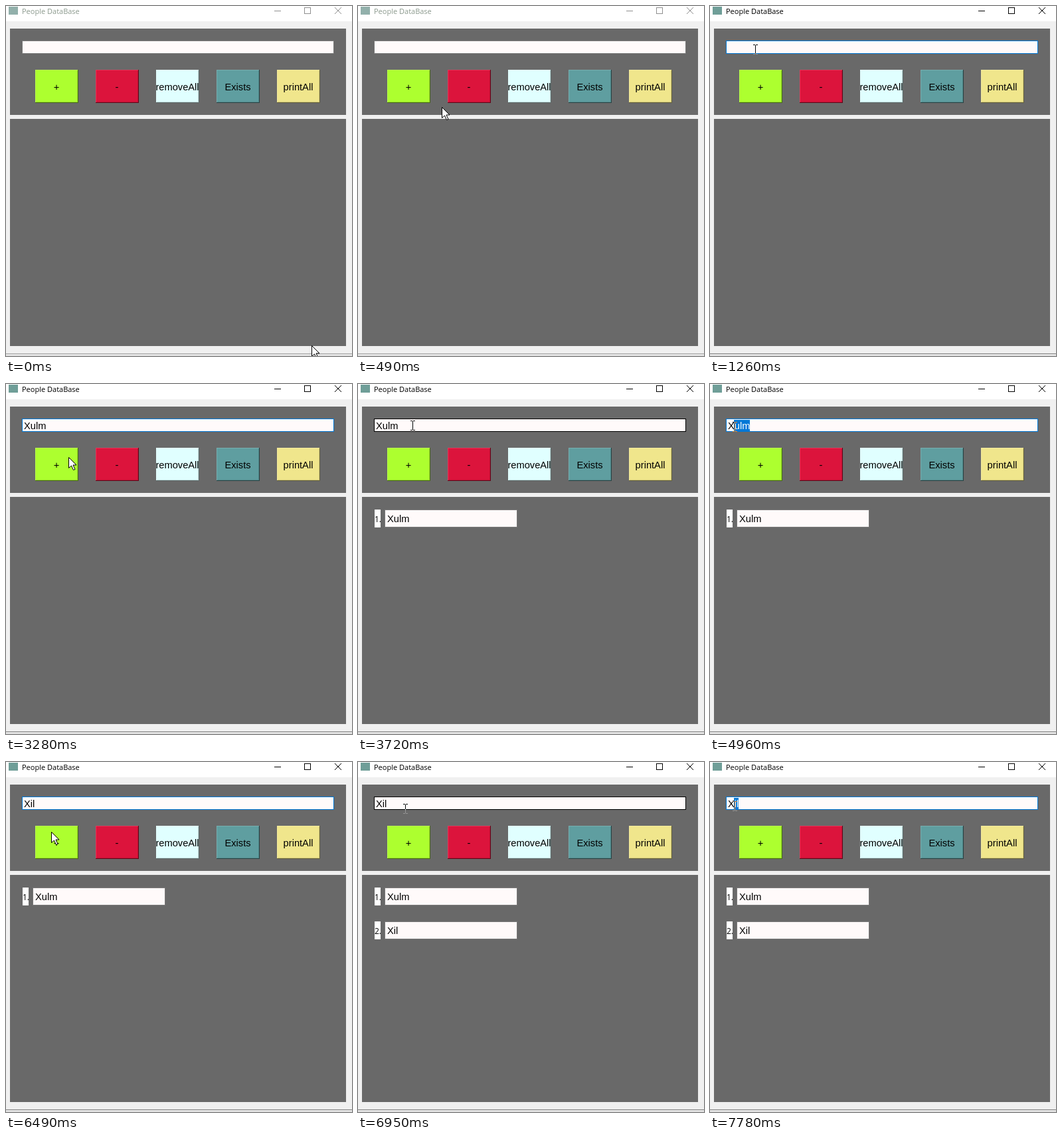
An HTML page with a canvas that plays this animation: 521x527 px, repeating every 8000 ms.

```html
<!DOCTYPE html>
<html lang="en">
<head>
<meta charset="utf-8">
<title>People DataBase</title>
<style>
  html, body { margin: 0; width: 100%; height: 100%; overflow: hidden; background: #f0f0f0; }
  canvas { display: block; }
</style>
</head>
<body>
<canvas id="stage" width="521" height="527"></canvas>
<script>
const ctx = document.getElementById('stage').getContext('2d', { alpha: false });
const LOOP = 8000;
const BLUE = '#0078d7', DIM = '#696969', SNOW = '#fffafa', IDLE = '#7a7a7a';
const UI_FONT = '14.67px "Liberation Sans", Arial, sans-serif';
const TITLE_FONT = '11px "Open Sans", "Noto Sans", sans-serif';
const NUMBER_FONT = '12px "Open Sans", "Noto Sans", sans-serif';
const FIELD = { x: 24, y: 52, w: 470, h: 20 };
const TEXT_X = 27;

const buttons = {
  '+': 'greenyellow', '-': 'crimson', removeAll: 'lightcyan', Exists: 'cadetblue', printAll: 'khaki'
};

// Each round: click into the field, type a name, press "+"
const rounds = [
  { name: 'Xulm', focus: 720, typing: 1690, pace: 270, add: 3440 },
  { name: 'Xil', focus: 3760, typing: 5380, pace: 160, add: 6600 },
  { name: '', focus: 7120, typing: LOOP, pace: 1, add: LOOP }
];

// Pointer glides: start time, end time, destination
const home = [460, 511];
const glides = [
  [20, 600, 92, 115],
  [600, 740, 72, 55],
  [850, 1260, 68, 65],
  [3110, 3280, 94, 110],
  [3560, 3720, 82, 62],
  [3760, 3980, 16, 63],
  [4260, 4960, 37, 64],
  [6270, 6490, 68, 105],
  [6750, 7020, 72, 63],
  [7120, 7500, 27, 68],
  [7730, 7780, 37, 66]
];

function pointerAt(t) {
  let [x, y] = home;
  for (const [start, end, toX, toY] of glides) {
    const u = Math.min(1, Math.max(0, (t - start) / (end - start)));
    const eased = u * u * (3 - 2 * u);
    x += (toX - x) * eased;
    y += (toY - y) * eased;
  }
  return [Math.round(x), Math.round(y)];
}

function typedAt(t) {
  const round = rounds.filter(r => r.typing <= t).pop();
  return round ? round.name.slice(0, 1 + Math.floor((t - round.typing) / round.pace)) : '';
}

function rect(x, y, w, h, color) {
  ctx.fillStyle = color;
  ctx.fillRect(x, y, w, h);
}

function frame(x, y, w, h, color) {
  ctx.strokeStyle = color;
  ctx.lineWidth = 1;
  ctx.strokeRect(x + .5, y + .5, w - 1, h - 1);
}

function text(str, x, y, color = '#000', font = UI_FONT, align = 'left') {
  ctx.font = font;
  ctx.textAlign = align;
  ctx.fillStyle = color;
  ctx.fillText(str, x, y);
}

function clipped(x, y, w, h, draw) {
  ctx.save();
  ctx.beginPath();
  ctx.rect(x, y, w, h);
  ctx.clip();
  draw();
  ctx.restore();
}

function drawWindow(active) {
  rect(0, 0, 521, 527, '#f0f0f0');
  rect(0, 0, 521, 23, '#fff');
  rect(4, 1, 14, 12, active ? '#6f9e98' : '#92b0ab');
  text('People DataBase', 24, 12, active ? '#000' : '#8c9a8e', TITLE_FONT);

  frame(449, 2, 10, 10, active ? '#000' : '#8f8f8f');
  ctx.beginPath();
  ctx.moveTo(404, 7.5); ctx.lineTo(414, 7.5);
  ctx.moveTo(495, 2); ctx.lineTo(505, 12);
  ctx.moveTo(505, 2); ctx.lineTo(495, 12);
  ctx.stroke();

  rect(6, 34, 506, 130, DIM);
  rect(6, 170, 506, 342, DIM);
  rect(0, 523, 521, 1, active ? '#858585' : '#a6a6a6');
  rect(0, 524, 521, 3, '#e2e2e2');
}

function drawButton([label, color], i) {
  const x = 44 + 91 * i, y = 96, w = 65, h = 50;
  const light = 'rgba(255,255,255,.15)', dark = 'rgba(0,0,0,.58)', shade = 'rgba(0,0,0,.12)';
  rect(x, y, w, h, color);
  rect(x, y, w - 1, 1, light);
  rect(x, y + 1, 1, h - 2, light);
  rect(x + 1, y + h - 2, w - 2, 1, shade);
  rect(x + w - 2, y + 1, 1, h - 3, shade);
  rect(x, y + h - 1, w, 1, dark);
  rect(x + w - 1, y, 1, h - 1, dark);
  clipped(x, y, w - 1, h, () => text(label, x + w / 2 - .5, 127, '#000', UI_FONT, 'center'));
}

function drawField(str, border, selectFrom) {
  const { x, y, w, h } = FIELD;
  rect(x, y, w, h, SNOW);
  frame(x, y, w, h, border);
  text(str, TEXT_X, 68);
  if (selectFrom < str.length) {
    const left = Math.floor(TEXT_X + ctx.measureText(str.slice(0, selectFrom)).width);
    const width = Math.round(TEXT_X + ctx.measureText(str).width) - left;
    clipped(left, 54, width, 17, () => {
      rect(left, 54, width, 17, BLUE);
      text(str, TEXT_X, 68, '#fff');
    });
  }
}

function drawRow(name, i) {
  const y = 189 + 51 * i;
  rect(25, y, 9, 27, '#fff');
  text(`${i + 1}.`, 25, y + 19, '#000', NUMBER_FONT);
  rect(40, y, 200, 27, SNOW);
  frame(40, y, 200, 27, IDLE);
  text(name, 44, y + 19);
}

function drawBeam(x, y) {
  ctx.save();
  ctx.globalCompositeOperation = 'difference';
  rect(x, y - 6, 1, 13, '#fff');
  for (const edge of [y - 7, y + 7]) {
    rect(x - 3, edge, 3, 1, '#fff');
    rect(x + 1, edge, 3, 1, '#fff');
  }
  ctx.restore();
}

function drawArrow(x, y) {
  const outline = [[0, 0], [0, 16], [4, 12.5], [7, 19], [9.5, 18], [6.5, 11.5], [11.5, 11.5]];
  ctx.beginPath();
  outline.forEach(([dx, dy]) => ctx.lineTo(x + dx + .5, y + dy + .5));
  ctx.closePath();
  ctx.fillStyle = '#fff';
  ctx.fill();
  ctx.strokeStyle = '#000';
  ctx.lineWidth = 1;
  ctx.stroke();
}

// Index of the character boundary nearest to x
function boundaryAt(str, x) {
  ctx.font = UI_FONT;
  const edge = n => TEXT_X + ctx.measureText(str.slice(0, n)).width;
  let n = 0;
  while (n < str.length && (edge(n) + edge(n + 1)) / 2 < x) n++;
  return n;
}

function draw(t) {
  const [x, y] = pointerAt(t);
  const str = typedAt(t);
  const focused = rounds.some(r => t >= r.focus && t < r.add);
  const selecting = rounds.some(r => t >= r.focus && t < r.typing);
  const hovered = x >= FIELD.x && x < FIELD.x + FIELD.w && y >= FIELD.y && y < FIELD.y + FIELD.h;

  drawWindow(t >= rounds[0].focus);
  drawField(str, focused ? BLUE : hovered ? '#000' : IDLE, selecting ? boundaryAt(str, x) : str.length);
  Object.entries(buttons).forEach(drawButton);
  rounds.filter(r => t >= r.add).forEach((r, i) => drawRow(r.name, i));
  (hovered || selecting ? drawBeam : drawArrow)(x, y);
}

function tick() {
  draw(performance.now() % LOOP);
  requestAnimationFrame(tick);
}
tick();
</script>
</body>
</html>
```
